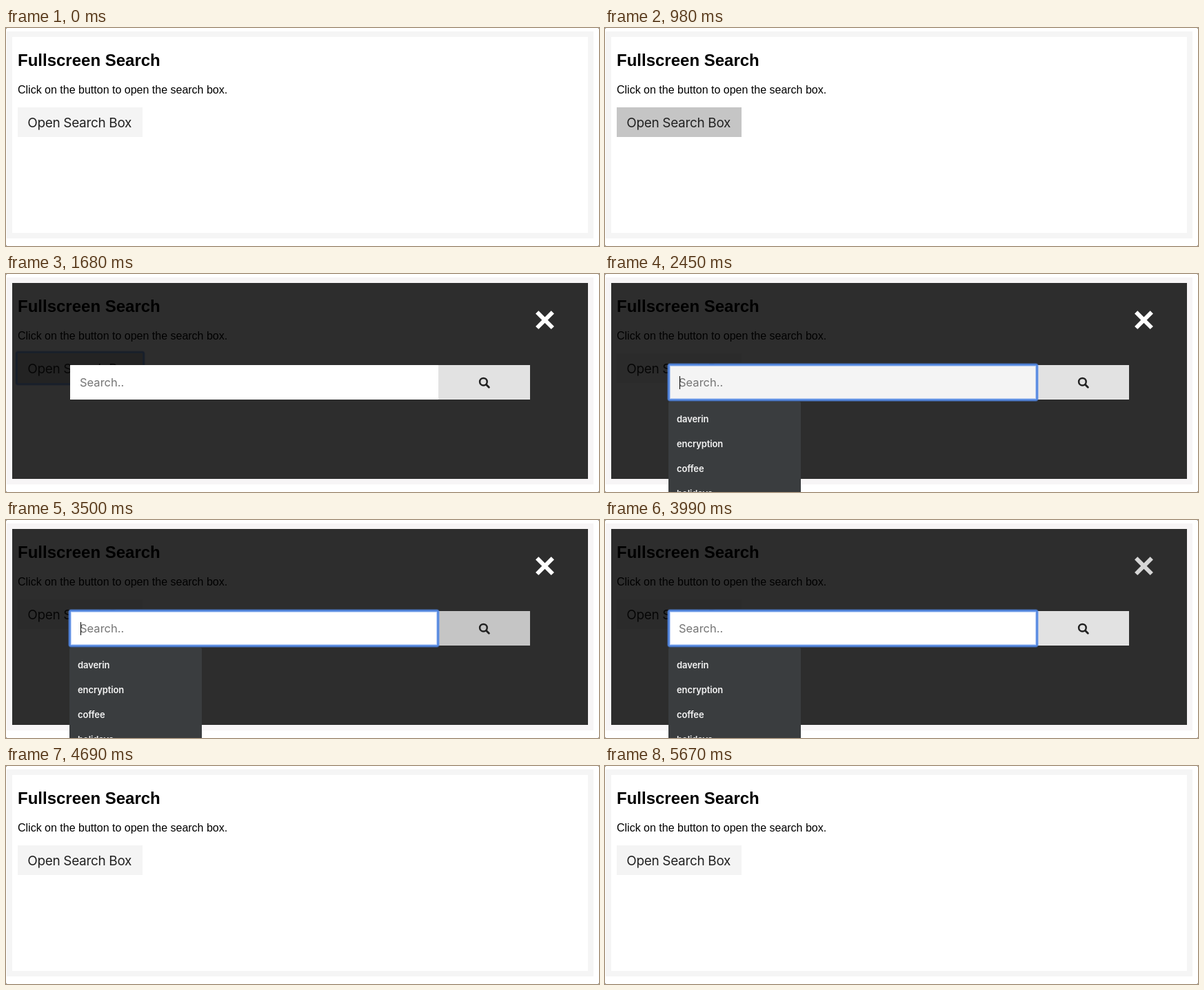
Animation, 860 px wide and 316 px high, one loop 5740 ms. Source, as an HTML page:

```html
<!DOCTYPE html>
<html lang="en">
<head>
<meta charset="utf-8">
<title>Fullscreen Search</title>
<style>
  html, body { margin: 0; width: 100%; height: 100%; overflow: hidden; background: #666; }
  svg { display: block; width: 860px; height: 316px; }
  .page { font-family: "Liberation Sans", Arial, sans-serif; }
  .ui { font-family: Inter, sans-serif; }
  .ring { fill: none; }
  .item { font-size: 13px; font-weight: 600; letter-spacing: -.1px; fill: #f4f4f4; }
</style>
</head>
<body>
<svg viewBox="0 0 860 316">
  <rect width="860" height="316" rx="2" fill="#fff"/>
  <rect id="frame" x="1" y="5" width="851" height="300" fill="#f5f5f5"/>
  <rect x="9" y="13" width="835" height="284" fill="#fff"/>

  <g class="page">
    <text x="17" y="55" font-size="24" font-weight="700">Fullscreen Search</text>
    <text x="17" y="95" font-size="16">Click on the button to open the search box.</text>
  </g>
  <g id="openRing" class="ring" opacity="0">
    <rect x="15.5" y="113.5" width="184" height="46" rx="2" stroke="#a9c4f4" stroke-width="5" opacity=".45"/>
    <rect x="15.5" y="113.5" width="184" height="46" rx="1.5" stroke="#84a9ec" stroke-width="2.6"/>
  </g>
  <rect id="openButton" x="17" y="115" width="181" height="43" fill="#f4f4f4"/>
  <text class="ui" x="31.3" y="144" font-size="19" letter-spacing="-.35" fill="#222">Open Search Box</text>

  <g id="overlay" class="ui" opacity="0">
    <rect x="9" y="13" width="835" height="284" fill="#000" fill-opacity=".824"/>
    <path id="close" d="M770.2 55.4l22.6 22.6m0-22.6l-22.6 22.6" fill="none" stroke="#fff" stroke-width="6"/>
    <rect id="input" x="93" y="132" width="534" height="50" fill="#fff"/>
    <rect id="go" x="627" y="132" width="133" height="50" fill="#e2e2e2"/>
    <g fill="none" stroke="#222" stroke-width="2.5">
      <circle cx="692.4" cy="156.2" r="5.3"/>
      <path d="M696.4 160.2l4 4" stroke-width="2.8" stroke-linecap="round"/>
    </g>
    <text x="107" y="163" font-size="16.5" fill="#757575">Search..</text>
    <rect id="caret" x="108" y="148" width="1" height="19" fill="#000" opacity="0"/>
    <g id="focus" opacity="0">
      <g class="ring">
        <rect x="92.5" y="131.5" width="534" height="51" rx="2" stroke="#4f86ee" stroke-width="5" opacity=".35"/>
        <rect x="92.5" y="131.5" width="534" height="51" rx="1.5" stroke="#5286e0" stroke-width="2.6"/>
      </g>
      <rect x="92" y="185" width="192" height="140" rx="2" fill="#3a3d3f"/>
      <g id="history"></g>
    </g>
  </g>
</svg>
<script>
  const LOOP = 5740;
  const $ = id => document.getElementById(id);

  ["daverin", "encryption", "coffee", "holidays"].forEach((word, i) => {
    const text = document.createElementNS("http://www.w3.org/2000/svg", "text");
    text.setAttribute("class", "item");
    text.setAttribute("x", 104);
    text.setAttribute("y", 215 + 36 * i);
    text.textContent = word;
    $("history").append(text);
  });

  // Each step is [time in ms, value], held until the next one.
  function hold(id, prop, ...steps) {
    const last = steps[steps.length - 1][1];
    const frames = [...steps, [LOOP, last]].map(([time, value]) =>
      ({ offset: time / LOOP, [prop]: value, easing: "steps(1, end)" }));
    $(id).animate(frames, { duration: LOOP, iterations: Infinity });
  }

  hold("openButton", "fill", [0, "#f4f4f4"], [840, "#c5c5c5"], [1750, "#f4f4f4"]);
  hold("openRing", "opacity", [0, 0], [1540, 1], [1750, 0]);
  hold("overlay", "opacity", [0, 0], [1680, 1], [4690, 0]);
  hold("frame", "fill", [0, "#f5f5f5"], [1680, "#f7f5f6"], [4690, "#f5f5f5"]);
  hold("focus", "opacity", [0, 0], [2450, 1], [4480, 0]);
  hold("input", "fill", [0, "#fff"], [2450, "#f4f4f4"], [3080, "#fff"]);
  hold("caret", "opacity", [0, 0], [2450, 1], [2870, .5], [2940, 0], [3500, 1], [3920, .5], [3990, 0]);
  hold("go", "fill", [0, "#e2e2e2"], [3500, "#c5c5c5"], [3640, "#e2e2e2"]);
  hold("close", "stroke", [0, "#fff"], [3780, "#d6d6d6"]);
</script>
</body>
</html>
```
